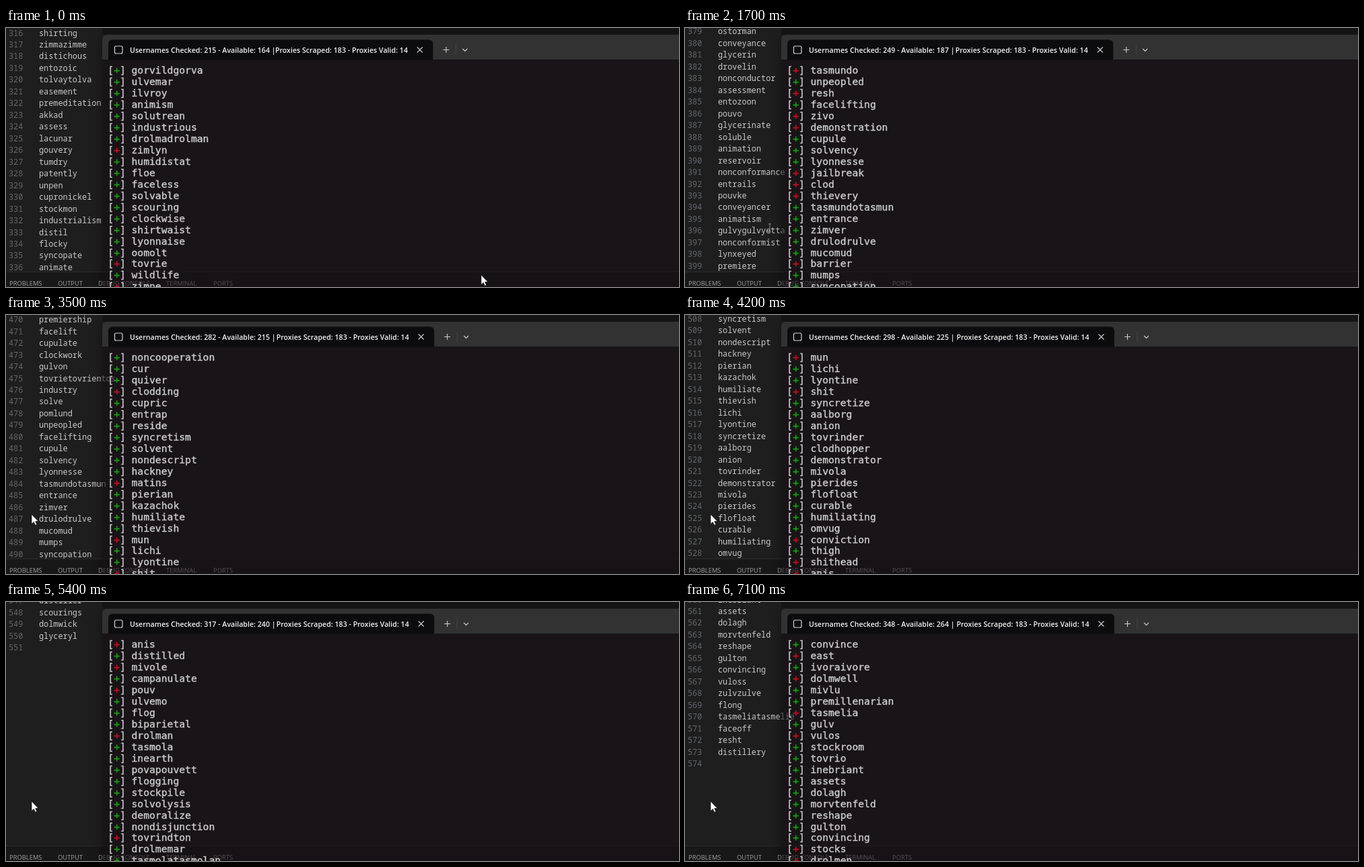
An HTML page with a canvas for the animation above (7200 ms loop, 1000 by 386 pixels).

```html
<!DOCTYPE html>
<html lang="en">
<head>
<meta charset="utf-8">
<title>Name checker</title>
<style>
html, body { margin: 0; width: 100%; height: 100%; overflow: hidden; background: #1d1d1d; }
canvas { display: block; }
</style>
</head>
<body>
<canvas id="stage" width="1000" height="386"></canvas>
<script>
const c = document.getElementById('stage').getContext('2d');
const LOOP = 7200, FIRST_LINE = 316, PITCH = 17.47, ROW = 16.97, AHEAD = 29;

// Checked names: "-" marks a taken one, "~" an available one that is not saved.
const checked = `gorvildgorva ulvemar ilvroy animism solutrean industrious drolmadrolman -zimlyn
humidistat floe faceless solvable scouring clockwise shirtwaist lyonnaise oomolt -tovrie wildlife
-zimne mump -ildun premiership facelift cupulate clockwork gulvon tovrietovrientos -animosity
-matinee industry solve -shirty pomlund -tasmundo unpeopled -resh facelifting -zivo -demonstration
cupule solvency lyonnesse -jailbreak -clod -thievery tasmundotasmun entrance zimver drulodrulve
mucomud -barrier mumps syncopation -duvos demonstrative bipack cloddish indwell humidity floeter
noncontributory dramvko aachen syncope -animus kayseri noncooperation cur quiver -clodding cupric
entrap reside syncretism solvent nondescript hackney -matins pierian kazachok humiliate thievish
-mun lichi lyontine -shit syncretize aalborg anion tovrinder ~clodhopper demonstrator mivola
pierides flofloat curable humiliating omvug -conviction thigh -shithead -anis distilled -mivole
campanulate -pouv ulvemo flog biparietal -drolman tasmola inearth povapouvett flogging stockpile
solvolysis demoralize nondisjunction -tovrindton drolmemar tasmolatasmolan curate -flogger
noneffective -humility distiller scourings -easterly dolmwick glyceryl faceplate thighbone convince
-east ivoraivore -dolmwell mivlu premillenarian -tasmelia gulv -vulos stockroom tovrio inebriant
assets dolagh morvtenfeld reshape gulton convincing -stocks -drolmen vuloss zulvzulve flong
tasmeliatasmelie faceoff resht ~stockpot -curb distillery`.split(/\s+/)
  .map(w => ({ word: w.replace(/^[-~]/, ''), free: w[0] !== '-', saved: !/^[-~]/.test(w) }));

const saved = `shirting zimmazimme distichous entozoic tolvaytolva easement premeditation akkad assess
lacunar gouvery tumdry patently unpen cupronickel stockmon industrialism distil flocky syncopate
animate biped faceted solstice clobber unpin resident scoundrel mumble champlain demonstrable
akkadian biotope jailbird glyceric convey faceharden lacustrine clockmaker easily shirtmaker
reservist pomlett drolvondrolk trichloroethylene biotype demonstrate zulbwar nonconcurrence premer
humiliation quitclaim entrain solution flora inebriate thicket stocking distinct lichen patent
campaign curator ostorman conveyance glycerin drovelin nonconductor assessment entozoon pouvo
glycerinate soluble animation reservoir nonconformance entrails pouvke conveyancer animatism
gulvygulvyetta nonconformist lynxeyed premiere mummify scour industrial cupola faceless wildcat
unperson floccose bipartisan shirring clockwise lacteal humeral distaste eastward quittance patron
stockade entreaty demotion solitude assertion jailer virtuous campfire residue gulshaw
wilding lichenin industrialize zimlil campanula gorvildgorvila lichenology easing scoundrelly mien
humidify quittor lichfield industrials scour pieria gulsvey distillation animator pouvtao lamprey
nonchalant curacy floral bipedal`.split(/\s+/);
const lines = saved.map(word => ({ word, due: -1 }));
checked.forEach((n, i) => n.saved && lines.push({ word: n.word, due: i }));

// Keys: [time, value, ...]
const counts = [[0, 0], [1000, 16], [1700, 34], [2700, 49], [4200, 83], [5400, 102], [7100, 133]];
const scroll = [[0, 315.57], [1000, 344.54], [1700, 378.69], [2700, 426.08], [4200, 507.66],
  [5000, 547.1], [6500, 547.1], [6900, 560.2]];
const pointer = [[0, 706, 368], [800, 126, 298], [1900, 126, 298], [2700, 48, 279], [3300, 38, 297]];

function at(keys, t, k = 1) {
  const i = keys.findIndex(key => key[0] > t);
  if (i < 0) return keys[keys.length - 1][k];
  const a = keys[i - 1], b = keys[i];
  return a[k] + (b[k] - a[k]) * (t - a[0]) / (b[0] - a[0]);
}

function text(s, x, y, color, weight = 0) {
  c.fillStyle = c.strokeStyle = color;
  c.fillText(s, x, y);
  if (weight) {
    c.lineWidth = weight;
    c.strokeText(s, x, y);
  }
}

function box(x, y, w, h, color, r = 0) {
  c.fillStyle = color;
  c.beginPath();
  c.roundRect(x, y, w, h, r);
  c.fill();
}

function stroke(color, width, ...paths) {
  c.strokeStyle = color;
  c.lineWidth = width;
  c.beginPath();
  for (const [start, ...rest] of paths) {
    c.moveTo(...start);
    rest.forEach(p => c.lineTo(...p));
  }
  c.stroke();
}

function editor(t, top) {
  box(0, 0, 1000, 386, '#1e1e1e');
  c.font = '11.86px "Noto Sans Mono", monospace';
  const first = at(scroll, t);
  const count = lines.filter(l => l.due < top + AHEAD).length;
  for (let n = Math.floor(first) - 1; n < first + 22; n++) {
    const i = n - FIRST_LINE, y = (n - first) * PITCH + 4;
    if (i > count) break;
    text(n, 4, y, '#62666b');
    if (i >= 0 && i < count) text(lines[i].word, 49, y, '#cacaca');
  }
  box(0, 363, 1000, 23, '#181818');
  box(0, 363, 1000, 1, '#2b2b2b');
  c.font = '9.4px "Open Sans", sans-serif';
  [['PROBLEMS', 5], ['OUTPUT', 77], ['DEBUG CONSOLE', 137], ['TERMINAL', 238], ['PORTS', 308]]
    .forEach(([s, x]) => text(s, x, 383.5, '#a0a0a0'));
}

function terminal(top) {
  box(143, 0, 857, 10, '#141414');
  // The shadow falls only outside the window.
  c.save();
  c.beginPath();
  c.rect(0, 0, 143, 386);
  c.clip();
  c.shadowColor = 'rgba(0,0,0,.4)';
  c.shadowBlur = 14;
  box(143, 10, 870, 400, '#000', 7);
  c.restore();
  box(143, 47, 870, 400, 'rgba(20,13,19,.56)');
  box(143, 10, 870, 37, '#323233', [7, 0, 0, 0]);

  const total = 215 + top;
  const free = 164 + checked.slice(AHEAD, top + AHEAD).filter(n => n.free).length;
  // A narrow digit 1 shortens the title and its tab.
  const ones = (`${total}${free}`.match(/1/g) || []).length;
  const x = 618.5 - 1.75 * ones;
  box(152, 17.5, x - 132.5, 30, '#0c0b0d', [6, 6, 0, 0]);

  c.strokeStyle = '#d8d8d8';
  c.lineWidth = 1.2;
  c.beginPath();
  c.roundRect(161.5, 27, 11.5, 11, 2);
  c.stroke();

  c.font = '600 10.65px "Open Sans", sans-serif';
  text(`Usernames Checked: ${total} - Available: ${free} |`, 184, 36.5, '#f4f4f4');
  c.textAlign = 'right';
  text('Proxies Scraped: 183 - Proxies Valid: 14', x - 18, 36.5, '#f4f4f4');
  c.textAlign = 'left';

  stroke('#cfcfcf', 1.1,
    [[x - 4, 28.5], [x + 4, 36.5]], [[x + 4, 28.5], [x - 4, 36.5]],
    [[x + 34.5, 32.5], [x + 43.5, 32.5]], [[x + 39, 28], [x + 39, 37]],
    [[x + 63.5, 31], [x + 67, 34.5], [x + 70.5, 31]]);
  stroke('#444', 1, [[x + 53.5, 25], [x + 53.5, 40]]);

  c.font = '14.7px "DejaVu Sans Mono", monospace';
  for (let i = 0; i < 20; i++) {
    const { word, free } = checked[top + i], y = 68 + i * ROW;
    text('[ ]', 151.3, y, '#cccccc', 0.4);
    text('+', 160.15, y, free ? '#13a10e' : '#c50f1f', 0.4);
    text(word, 186.5, y, '#cccccc', 0.4);
  }
}

function mouse(t) {
  const x = at(pointer, t), y = at(pointer, t, 2);
  if (x > 52 && x < 143) {
    stroke('#8a8a8a', 1, [[x - 2, y - 6], [x + 2, y - 6]], [[x, y - 6], [x, y + 6]],
      [[x - 2, y + 6], [x + 2, y + 6]]);
    return;
  }
  const shape = [[0, 0], [0, 14.5], [3.3, 11.5], [5.6, 16.3], [7.9, 15.2], [5.7, 10.6], [10, 10.4]];
  c.beginPath();
  shape.forEach(([dx, dy]) => c.lineTo(x + dx, y + dy));
  c.closePath();
  c.fillStyle = '#fff';
  c.fill();
  c.strokeStyle = '#111';
  c.lineWidth = 0.7;
  c.stroke();
}

const start = performance.now();
function draw(now) {
  const t = Math.floor(Math.max(0, now - start) % LOOP / 100) * 100;
  const top = Math.floor(at(counts, t) + 1e-6);
  editor(t, top);
  terminal(top);
  mouse(t);
  requestAnimationFrame(draw);
}
draw(start);
</script>
</body>
</html>
```
